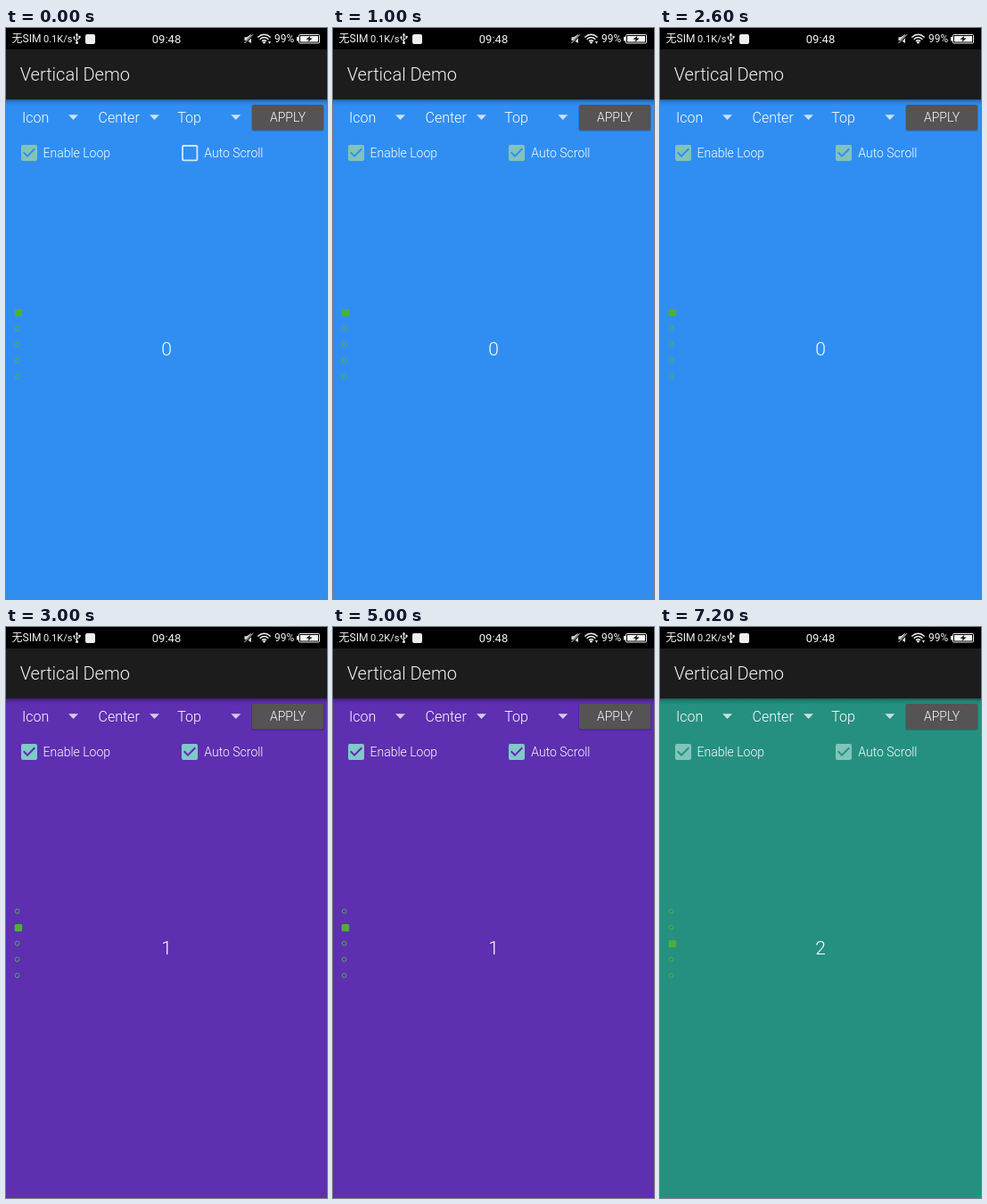
These frames come from a looping animation (360 px wide and 640 px high, 8 s). An HTML page:

```html
<!DOCTYPE html>
<html lang="en">
<head>
<meta charset="utf-8">
<title>Vertical Demo</title>
<style>
  html, body { margin: 0; width: 100%; height: 100%; overflow: hidden; background: #000; }
  svg { display: block; width: 100vw; height: 100vh; }
  text { font-family: Roboto, "Noto Sans CJK SC", "Noto Sans CJK", sans-serif; font-weight: 300; fill: #fff; }
  .status text { font-weight: 400; font-size: 12px; fill: #f4f4f4; }
  .status .speed { font-size: 11px; }
  .title { font-size: 20px; fill: #f2f2f2; }
  .spin { font-size: 16px; }
  .label { font-size: 14px; }
  .num { font-size: 21px; text-anchor: middle; }
  .mid { text-anchor: middle; }

  .step { animation: 8s step-end infinite; }
  .page { fill: #308ef2; animation-name: page; }
  .tint { fill: #82c3b9; animation-name: tint; }
  .current { animation-name: current; }
  .first { opacity: 0; animation-name: first; }
  .second { opacity: 0; animation-name: second; }
  .third { opacity: 0; animation-name: third; }
  .off { opacity: 0; animation-name: off; }
  .on { opacity: 0; animation-name: on; }
  .slow { opacity: 0; animation-name: slow; }
  .fast { opacity: 0; animation-name: fast; }
  .signal { animation-name: signal; }

  @keyframes page { 0% { fill: #308ef2; } 37.5% { fill: #5e2fb0; } 75% { fill: #269080; } }
  @keyframes tint { 0% { fill: #82c3b9; } 37.5% { fill: #80c9c8; } 75% { fill: #80c5bb; } }
  @keyframes current {
    0% { transform: translateY(0); }
    37.5% { transform: translateY(18px); }
    75%, 100% { transform: translateY(36px); }
  }
  @keyframes first { 0% { opacity: 1; } 37.5%, 100% { opacity: 0; } }
  @keyframes second { 0% { opacity: 0; } 37.5% { opacity: 1; } 75%, 100% { opacity: 0; } }
  @keyframes third { 0% { opacity: 0; } 75%, 100% { opacity: 1; } }
  @keyframes off { 0% { opacity: 1; } 12.5%, 100% { opacity: 0; } }
  @keyframes on { 0% { opacity: 0; } 12.5%, 100% { opacity: 1; } }
  @keyframes slow { 0% { opacity: 1; } 62.5%, 100% { opacity: 0; } }
  @keyframes fast { 0% { opacity: 0; } 62.5%, 100% { opacity: 1; } }
  @keyframes signal { 0% { opacity: 1; } 25% { opacity: 0; } 50%, 100% { opacity: 1; } }
</style>
</head>
<body>
<svg viewBox="0 0 360 640" preserveAspectRatio="none">
  <defs>
    <linearGradient id="shade" x2="0" y2="1">
      <stop offset="0" stop-opacity=".38"/>
      <stop offset=".4" stop-opacity=".12"/>
      <stop offset="1" stop-opacity="0"/>
    </linearGradient>
    <path id="checked" fill-rule="evenodd" d="M5 3H19a2 2 0 0 1 2 2V19a2 2 0 0 1-2 2H5a2 2 0 0 1-2-2V5a2 2 0 0 1 2-2ZM10 17 19 8 17.6 6.6 10 14.2 6.4 10.6 5 12Z"/>
    <path id="arrow" d="M0 0H11L5.5 5.7Z" fill="#fff" fill-opacity=".74"/>
    <circle id="ring" cx="12.6" cy="318.6" r="2.4" fill="none" stroke="#4caf50"/>
  </defs>

  <rect class="step page" width="360" height="640"/>
  <rect y="80" width="360" height="7" fill="url(#shade)"/>
  <rect width="360" height="24" fill="#000"/>
  <rect y="24" width="360" height="56" fill="#1c1c1c"/>

  <g class="status">
    <text x="6.5" y="16.3">无SIM</text>
    <text class="speed step slow" x="42" y="16">0.1K/s</text>
    <text class="speed step fast" x="42" y="16">0.2K/s</text>
    <g fill="none" stroke="#eee" stroke-width="1">
      <path d="M79.5 8V16M79.5 14.5 76.5 12.5V10.5M79.5 13 82.5 11.5V9.5"/>
    </g>
    <path d="M79.5 5.6 81.3 8.6H77.7Z" fill="#eee"/>
    <circle cx="79.5" cy="16.6" r="1.5" fill="#eee"/>
    <circle cx="76.5" cy="10.4" r="1.1" fill="#eee"/>
    <rect x="81.4" y="8.8" width="2.2" height="2.2" fill="#eee"/>
    <rect x="89" y="7" width="11" height="11" rx="2" fill="#eee"/>
    <text class="mid" x="180" y="16.7" style="font-size:13px">09:48</text>
    <path d="M267.5 10.3H270L275 7V17L270 14H267.5Z" fill="#ddd"/>
    <path d="M267.5 17.5 277.5 7" stroke="#000" stroke-width="2.4"/>
    <path d="M267.5 17 277 7.2" stroke="#ddd" stroke-width="1"/>
    <g fill="none" stroke="#f4f4f4" stroke-width="1.4">
      <path d="M282.3 10.5Q289.5 4 296.7 10.5M284.6 12.7Q289.5 8.3 294.4 12.7M287 14.9Q289.5 12.7 292 14.9"/>
    </g>
    <circle cx="289.5" cy="16.3" r="1.3" fill="#f4f4f4"/>
    <path class="step signal" d="M294 15H297L295.5 18Z" fill="#ddd"/>
    <text x="301" y="16.3">99%</text>
    <rect x="326" y="10" width="2" height="4.5" fill="#eee"/>
    <rect x="328.5" y="7.5" width="23" height="9.5" rx="1" fill="none" stroke="#eee"/>
    <rect x="330" y="9" width="20" height="6.5" fill="#f4f4f4"/>
    <path d="M341.5 8.8 336.5 12.8H339.7L338.7 15.7 343.7 11.6H340.4Z" fill="#000"/>
  </g>

  <text class="title" x="15.7" y="59">Vertical Demo</text>

  <text class="spin" x="18" y="105.7">Icon</text>
  <text class="spin" x="103.5" y="105.7">Center</text>
  <text class="spin" x="192.3" y="105.7">Top</text>
  <use href="#arrow" x="70" y="97.3"/>
  <use href="#arrow" x="161" y="97.3"/>
  <use href="#arrow" x="252.3" y="97.3"/>

  <rect x="275.3" y="86.3" width="81.4" height="29.4" rx="2.5" fill-opacity=".2"/>
  <rect x="276" y="86" width="80" height="28.5" rx="2" fill="#555354"/>
  <text class="label mid" x="316" y="105">APPLY</text>

  <g class="step tint">
    <use href="#checked" x="14" y="128"/>
    <use class="step on" href="#checked" x="194" y="128"/>
  </g>
  <rect class="step off" x="198" y="132" width="16.4" height="16.4" rx="1.2" fill="none" stroke="#fff" stroke-opacity=".78" stroke-width="1.9"/>
  <text class="label" x="41.5" y="145">Enable Loop</text>
  <text class="label" x="222.3" y="145">Auto Scroll</text>

  <use href="#ring"/>
  <use href="#ring" y="18"/>
  <use href="#ring" y="36"/>
  <use href="#ring" y="54"/>
  <use href="#ring" y="72"/>
  <rect class="step current" x="9.7" y="315" width="8.5" height="8.3" rx="1.5" fill="#4caf3c"/>

  <text class="num step first" x="180" y="367">0</text>
  <text class="num step second" x="180" y="367">1</text>
  <text class="num step third" x="180" y="367">2</text>
</svg>
</body>
</html>
```
